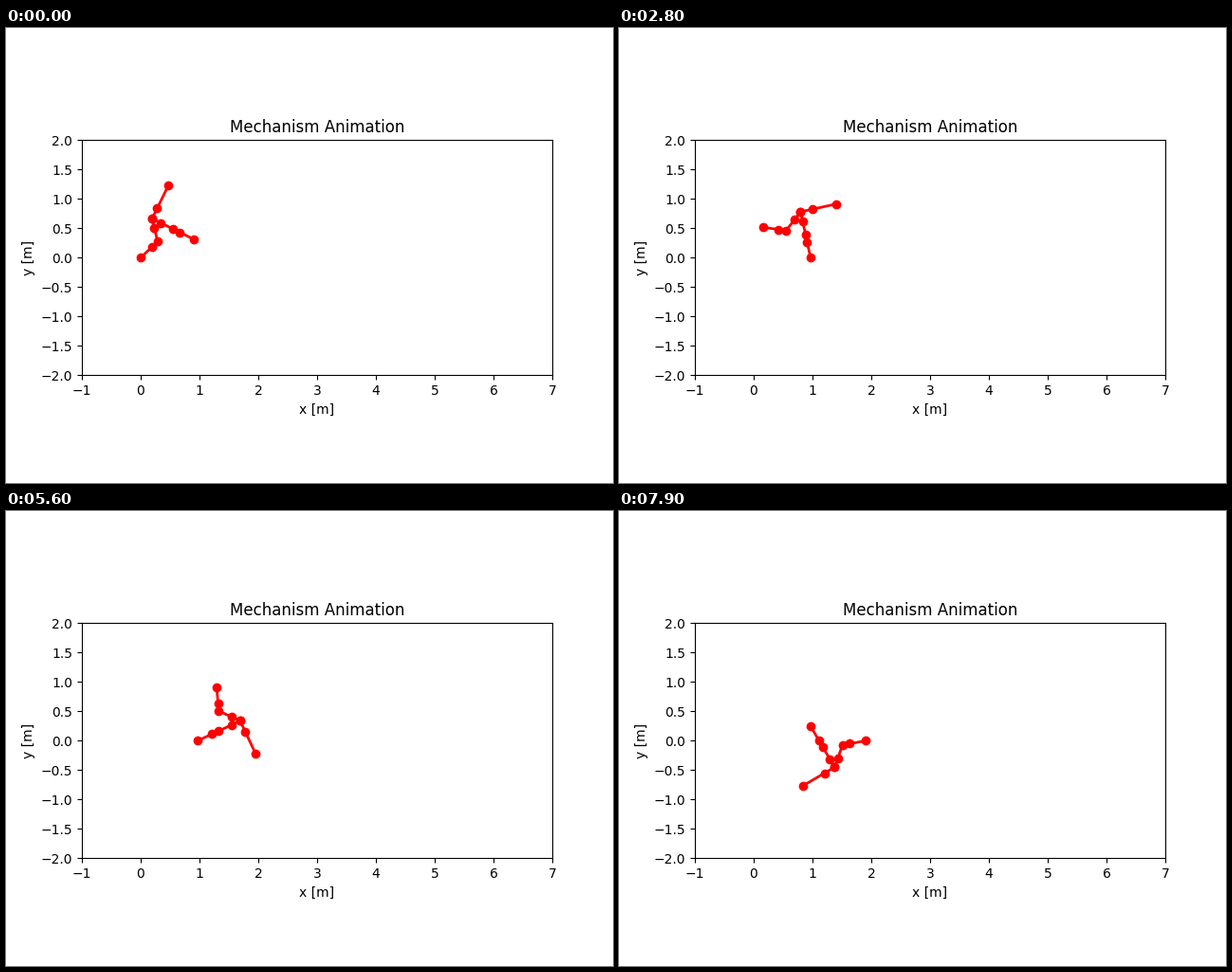
Animation of 640 by 480 pixels, one loop 8000 ms. Source, as a matplotlib script:

```python
import numpy as np
import matplotlib.pyplot as plt
from matplotlib.animation import FuncAnimation

FRAMES, INTERVAL = 80, 100

# Link lengths and mass-centre offsets [m]
LEG, TORSO = 0.4, 0.625
SHANK_C, THIGH_C, TORSO_C = 0.128, 0.163, 0.2

# Link directions when both feet are level [deg]
SHANK_A, THIGH_A, BODY, THIGH_B, SHANK_B = 25.2, 85.0, 45.1, -44.9, -45.2

# Contact points of the successive stance feet
CONTACTS = [0.0, 0.967, 1.904]

# Second step: the body tips over its front foot like an inverted pendulum
TOUCH = 1.52
tilt = np.linspace(0, -180, 1801)
rate = np.sqrt(600 + 760 * (1 - np.cos(np.radians(tilt + 36))))
clock = TOUCH + np.concatenate(([0], np.cumsum(0.2 / (rate[1:] + rate[:-1]))))


def link(length, deg):
    return length * np.array([np.cos(np.radians(deg)), np.sin(np.radians(deg))])


def build_body():
    foot_a = np.zeros(2)
    knee_a = link(LEG, SHANK_A)
    hip = knee_a + link(LEG, THIGH_A)
    knee_b = hip + link(LEG, THIGH_B)
    foot_b = knee_b + link(LEG, SHANK_B)
    legs = [foot_a, knee_a - link(SHANK_C, SHANK_A), knee_a,
            hip - link(THIGH_C, THIGH_A), hip,
            hip + link(THIGH_C, THIGH_B), knee_b,
            knee_b + link(SHANK_C, SHANK_B), foot_b]
    torso = [hip, hip + link(TORSO_C, BODY), hip + link(TORSO, BODY)]
    return np.array(legs), np.array(torso)


LEGS, TRUNK = build_body()


def motion(t):
    """Return step number and body rotation in degrees."""
    if t < TOUCH:
        return 0, 18.7 - 10.9 * t - 0.92 * t * t
    if t < clock[-1]:
        return 1, np.interp(t, clock, tilt)
    return 2, -180 - 27.9 * (t - clock[-1])


def pose(t):
    step, deg = motion(t)
    c, s = np.cos(np.radians(deg)), np.sin(np.radians(deg))
    turn = np.array([[c, s], [-s, c]])
    pivot = LEGS[-1] if step == 1 else LEGS[0]
    base = np.array([CONTACTS[step], 0.0])
    return [(part - pivot) @ turn + base for part in (LEGS, TRUNK)]


fig, ax = plt.subplots(figsize=(6.4, 4.8), dpi=100)
ax.set_aspect("equal")
ax.set_xlim(-1, 7)
ax.set_ylim(-2, 2)
ax.set_xlabel("x [m]")
ax.set_ylabel("y [m]")
ax.set_title("Mechanism Animation")
lines = [ax.plot([], [], "o-", color="red", lw=2)[0] for _ in range(2)]


def update(i):
    for line, pts in zip(lines, pose(i * INTERVAL / 1000)):
        line.set_data(pts[:, 0], pts[:, 1])
    return lines


anim = FuncAnimation(fig, update, frames=FRAMES, interval=INTERVAL, repeat=True)
plt.show()
```
